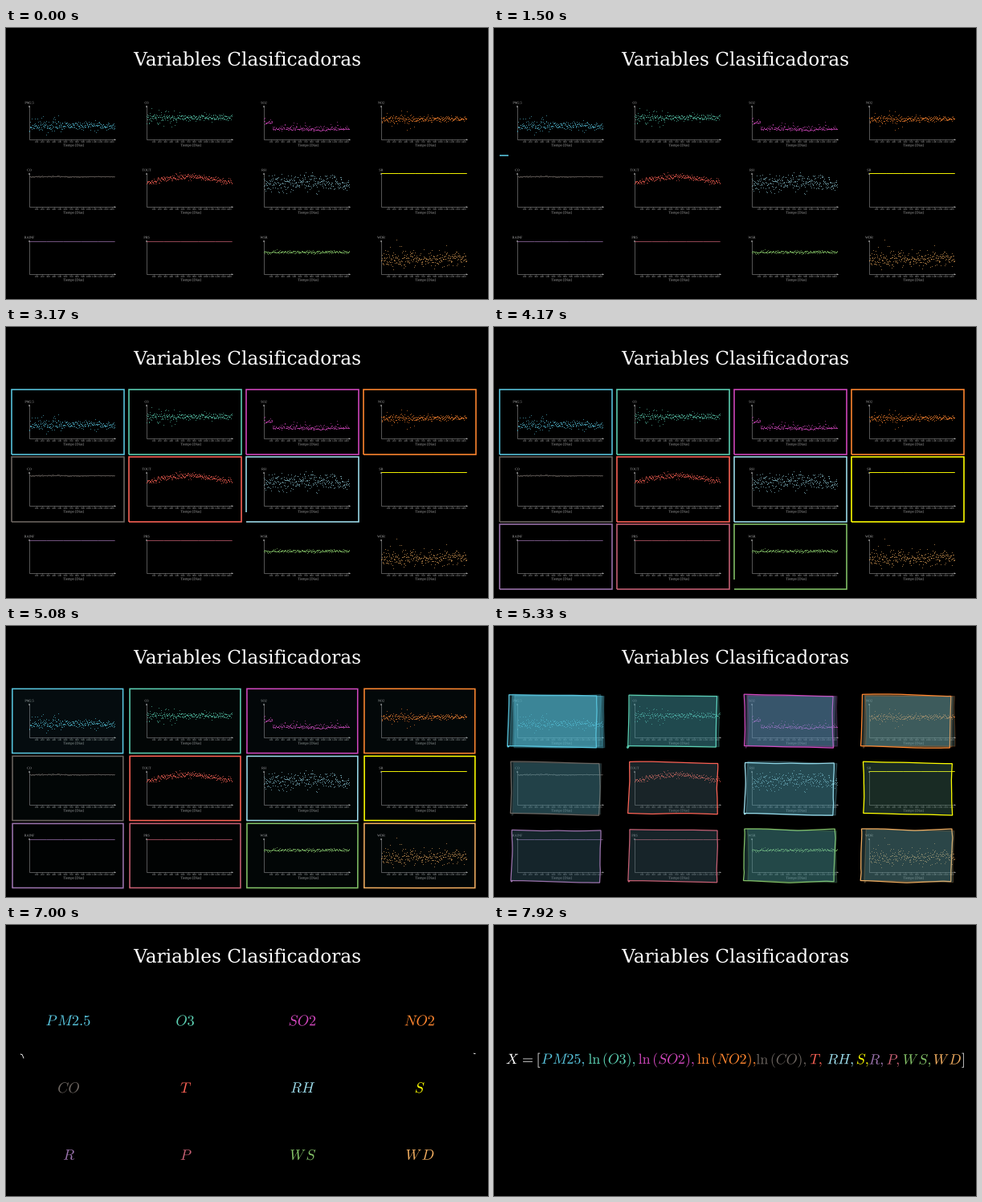
Write a matplotlib script that moves like this. It is 600 by 338 pixels and loops after 8 s.

```python
import numpy as np
import matplotlib.pyplot as plt
from matplotlib.animation import FuncAnimation
from matplotlib.collections import PathCollection
from matplotlib.colors import to_rgb
from matplotlib.patches import PathPatch
from matplotlib.path import Path
from matplotlib.textpath import TextPath

W, H, DPI = 600, 338, 100
FPS = 12                           # pace of the motion
FRAMES, INTERVAL = 200, 40
PX = 72 / DPI                      # points per pixel
plt.rcParams["mathtext.fontset"] = "cm"

DRAW_START, DRAW_EACH = 1465, 250  # frames are traced one after another
MORPH_START, JOIN_START, RUN = 4965, 6965, 1000
BOX_W, BOX_H, BOX_LW = 140, 81.5, 1.6
N = 200                            # samples per outline, multiple of 4
BLUE = np.array(to_rgb("#58C4DD"))
BASELINE = 173.2
DOT_ALPHA = .55

# plot label, symbol, vector entry, entry x, colour, level, arch, spread, early spread
VARS = [
    ("PM2.5", r"P\,M2.5", r"P\,M25,", 59.5, "#58C4DD", 17.5, 0, 2.2, 6),
    ("O3", "O3", r"\mathrm{ln}\,(O3),", 117.5, "#5CD0B3", 28, 0, 1.9, 6),
    ("SO2", "SO2", r"\mathrm{ln}\,(SO2),", 179.5, "#D147BD", 13, 0, 2.8, 6),
    ("NO2", "NO2", r"\mathrm{ln}\,(NO2),", 252.5, "#FF862F", 26, 0, 1.7, 5),
    ("CO", "CO", r"\mathrm{ln}\,(CO),", 328, "#6B645F", 37.7, .6, .25, .5),
    ("TOUT", "T", "T,", 394.5, "#FC6255", 30.5, 7.5, 1.8, 2),
    ("RH", "RH", "RH,", 415.5, "#9CDCEB", 29, 2, 5, 6),
    ("SR", "S", "S,", 451.5, "#FFFF00", 42, 0, .05, .05),
    ("RAINF", "R", "R,", 469, "#9A72AC", 41.3, 0, .05, .05),
    ("PRS", "P", "P,", 490.5, "#C55F73", 41.6, 0, .05, .05),
    ("WSR", r"W\,S", r"W\,S,", 510.5, "#83C167", 28, 0, 1, 1),
    ("WDR", r"W\,D", r"W\,D", 548, "#F0AC5F", 19.5, 0, 4, 6),
]
LINES = {"CO": .7, "SR": 1.1, "RAINF": .6, "PRS": .6}


def smooth(x):
    """Sigmoid ease from 0 to 1."""
    x = np.clip(x, 0, 1)
    edge = 1 / (1 + np.exp(5))
    return float(np.clip((1 / (1 + np.exp(-10 * (x - .5))) - edge) / (1 - 2 * edge), 0, 1))


def center(k):
    return 77 + 146 * (k % 4), 118.5 + 84 * (k // 4)


# ---- outlines -------------------------------------------------------------

def resample(loop):
    """N + 1 points evenly spaced along a closed outline, from its top left."""
    if np.hypot(*(loop[0] - loop[-1])) > 1e-6:
        loop = np.vstack([loop, loop[:1]])
    d = np.r_[0, np.cumsum(np.hypot(*np.diff(loop, axis=0).T))]
    s = np.linspace(0, d[-1], N + 1)
    pts = np.column_stack([np.interp(s, d, loop[:, 0]), np.interp(s, d, loop[:, 1])])
    top = np.argmin(pts[:-1] @ [.2, 1])
    pts = np.roll(pts[:-1], -top, axis=0)
    return np.vstack([pts, pts[:1]])


def oriented(loop, sign):
    x, y = loop.T
    area = np.sum(x[:-1] * y[1:] - x[1:] * y[:-1])
    return loop if area * sign > 0 else loop[::-1]


def inside(a, b):
    return (a.min(0) > b.min(0)).all() and (a.max(0) < b.max(0)).all()


def glyphs(tex, em, mid=None, left=None):
    """Letters of a formula, each a list of outlines (body first, then holes)."""
    tp = TextPath((0, 0), f"${tex}$", size=100)
    polys = Path(tp.vertices, tp.codes).to_polygons(closed_only=False)
    loops = [resample(np.asarray(p) * [em / 100, -em / 100]) for p in polys if len(p) > 3]
    pts = np.vstack(loops)
    if mid is not None:
        shift = np.array(mid) - (pts.min(0) + pts.max(0)) / 2
    else:
        shift = np.array([left - pts[:, 0].min(), BASELINE])
    loops = [p + shift for p in loops]
    out = []
    for p in loops:
        if any(inside(p, q) for q in loops):
            continue
        holes = [oriented(q, 1) for q in loops if inside(q, p)]
        out.append([oriented(p, -1)] + holes)
    return out


def box_corners(k):
    cx, cy = center(k)
    x0, x1 = cx - BOX_W / 2, cx + BOX_W / 2
    y0, y1 = cy - BOX_H / 2, cy + BOX_H / 2
    return np.array([(x0, y1), (x1, y1), (x1, y0), (x0, y0), (x0, y1)])


def box_loop(k):
    s = np.linspace(0, 4, N + 1)
    c = box_corners(k)
    return np.column_stack([np.interp(s, range(5), c[:, j]) for j in (0, 1)])


def partial_box(k, p):
    c, s = box_corners(k), 4 * p
    n = min(int(s), 3)
    return np.vstack([c[:n + 1], c[n] + (c[n + 1] - c[n]) * (s - n)])


def codes(n_loops):
    one = [Path.MOVETO] + [Path.LINETO] * (N - 1) + [Path.CLOSEPOLY]
    return np.array(one * n_loops, dtype=np.uint8)


# ---- moving parts ---------------------------------------------------------

class Morph:
    """One outline group turning into another; copies start transparent."""

    def __init__(self, ax, src, dst, color, is_copy, from_box):
        n = max(len(src), len(dst))
        self.src, self.dst = (self.pad(g, n) for g in (src, dst))
        self.codes = codes(n)
        self.color = np.array(to_rgb(color))
        self.is_copy, self.from_box = is_copy, from_box
        self.patch = PathPatch(Path(self.src, self.codes), lw=0, visible=False,
                               zorder=3, joinstyle="miter")
        ax.add_patch(self.patch)

    @staticmethod
    def pad(group, n):
        dot = np.repeat(group[-1][-1:], N + 1, axis=0)
        return np.vstack(group + [dot] * (n - len(group)))

    def show(self, a):
        p = self.patch
        p.set_visible(True)
        p.set_path(Path(self.src + (self.dst - self.src) * a, self.codes))
        shown = a if self.is_copy else 1
        if self.from_box:
            p.set_facecolor((*(BLUE + (self.color - BLUE) * a), a))
            p.set_edgecolor((*self.color, shown))
            p.set_linewidth(BOX_LW * (1 - a) * PX)
        else:
            p.set_facecolor((*self.color, shown))
            p.set_edgecolor("none")


class Pen:
    """Trace a letter's outline, then fill it."""

    def __init__(self, ax, group):
        self.pts, self.codes = np.vstack(group), codes(len(group))
        self.patch = PathPatch(Path(self.pts, self.codes), visible=False, zorder=3)
        ax.add_patch(self.patch)

    def show(self, p):
        n = int(round(min(2 * p, 1) * len(self.pts)))
        fill = max(2 * p - 1, 0)
        self.patch.set_visible(n > 1)
        if n > 1:
            self.patch.set_path(Path(self.pts[:n], self.codes[:n]))
            self.patch.set_facecolor((1, 1, 1, fill))
            self.patch.set_edgecolor((1, 1, 1, 1 if fill < 1 else 0))
            self.patch.set_linewidth(.85 * (1 - fill) * PX)


def morphs(ax, src, dst, color, from_box=False):
    """Repeat source letters so that every target letter has a partner."""
    out, last = [], -1
    for j, g in enumerate(dst):
        i = j * len(src) // len(dst)
        out.append(Morph(ax, src[i], g, color, i == last, from_box))
        last = i
    return out


# ---- static parts ---------------------------------------------------------

def text_path(s, size, x, y, family="Liberation Serif"):
    tp = TextPath((0, 0), s, size=size, prop={"family": family})
    v = tp.vertices * [1, -1]
    mid = (tp.get_extents().x0 + tp.get_extents().x1) / 2
    return Path(v + [x - mid, y], tp.codes)


def triangle(x, y, dx, dy):
    """Arrow tip at (x, y) pointing along (dx, dy)."""
    t = np.array([x, y])
    d, n = np.array([dx, dy]), np.array([-dy, dx])
    return Path([t, t - 2.4 * d + n, t - 2.4 * d - n, t], closed=True)


def make_plot(ax, k, label, color, level, arch, sd, early):
    """Axes, labels and dots of one plot, each with its opacity."""
    cx, cy = center(k)
    x0, y0 = cx - 48, cy + 20.8
    rng = np.random.default_rng(40 + k)

    ticks = [x0 + 9 + 7.2 * j for j in range(14)]
    lines = [Path([(x0, y0), (x0 + 107, y0)]), Path([(x0, y0), (x0, y0 - 42)])]
    lines += [Path([(x, y0 - .8), (x, y0 + .8)]) for x in ticks]
    axes = PathCollection(lines, facecolors="none", edgecolors="#9a9a9a",
                          linewidths=.55 * PX, zorder=1)
    words = [text_path(str(100 * (j + 1)), 3.1, x, y0 + 3.6) for j, x in enumerate(ticks)]
    words += [text_path("Tiempo [Días]", 4.4, cx + 7, y0 + 8.2),
              text_path(label, 4.2, x0, y0 - 44.8),
              triangle(x0 + 108, y0, 1, 0), triangle(x0, y0 - 43, 0, -1)]
    marks = PathCollection(words, facecolors="#b4b4b4", edgecolors="none",
                           linewidths=0, zorder=1)
    for c in (axes, marks):
        ax.add_collection(c)

    n = 420 if label in LINES else 290
    u = np.linspace(0, 1, n)
    noise = rng.standard_normal(n)
    wild = (u < .4) & (rng.random(n) < .55)
    if label == "SO2":
        noise = np.abs(noise) * (rng.random(n) < .6) + .12 * noise
        level = level + 8 * (u < .1) - 1.2 * (u > .45) * (u < .75)
    up = level + arch * np.sin(np.pi * u ** .95) + noise * np.where(wild, early, sd)
    if label == "WDR":
        up += (rng.random(n) < .08) * rng.normal(4, 7, n)
    if label == "CO":
        up += .35 * np.sin(9 * u)
    d = LINES.get(label, .95) * PX
    dots = ax.scatter(x0 + 106 * u, y0 - np.clip(up, 6, 43), s=d * d, c=color,
                      linewidths=0, zorder=2)
    return [(axes, 1), (marks, 1), (dots, DOT_ALPHA)]


fig = plt.figure(figsize=(W / DPI, H / DPI), dpi=DPI, facecolor="black")
ax = fig.add_axes([0, 0, 1, 1])
ax.set(xlim=(0, W), ylim=(H, 0))
ax.axis("off")
ax.set_autoscale_on(False)
ax.add_patch(PathPatch(text_path("Variables Clasificadoras", 23.2, 299.9, 46.8, "DejaVu Serif"),
                       fc="white", lw=0, zorder=4))

plots, boxes, shrink, join = [], [], [], []
for k, (label, symbol, entry, left, color, *shape) in enumerate(VARS):
    plots += make_plot(ax, k, label, color, *shape)
    boxes += ax.plot([], [], color=color, lw=BOX_LW * PX, solid_joinstyle="miter",
                     solid_capstyle="butt", zorder=3)
    cx, cy = center(k)
    sym = glyphs(symbol, 18.4, mid=(cx + .3, cy + .4))
    shrink += morphs(ax, [[box_loop(k)]], sym, color, from_box=True)
    join += morphs(ax, sym, glyphs(entry, 18, left=left), color)

# letters written in white, with their start lag
pens = [(Pen(ax, g), lag, total)
        for tex, left, lag, total in (("X", 15.3, 0, 1.4), ("=", 36, .2, 1.4),
                                      ("[", 54.7, .4, 1.4), ("]", 582.5, 0, 1))
        for g in glyphs(tex, 18, left=left)]


def update(i):
    t = round(i * INTERVAL * FPS / 1000) * 1000 / FPS
    a = smooth((t - MORPH_START) / RUN)
    for p, opacity in plots:
        p.set_alpha(opacity * (1 - a))
        p.set_visible(a < 1)

    for k, box in enumerate(boxes):
        p = smooth((t - DRAW_START) / DRAW_EACH - k)
        box.set_visible(p > 0 and t < MORPH_START)
        if p > 0:
            box.set_data(*partial_box(k, p).T)

    for group, start, end in ((shrink, MORPH_START, JOIN_START), (join, JOIN_START, 1e9)):
        for m in group:
            if start <= t < end:
                m.show(smooth((t - start) / RUN))
            else:
                m.patch.set_visible(False)

    w = np.clip((t - JOIN_START) / RUN, 0, 1)
    for pen, lag, total in pens:
        pen.show(np.clip(w * total - lag, 0, 1))
    return []


anim = FuncAnimation(fig, update, frames=FRAMES, init_func=lambda: [],
                     interval=INTERVAL, repeat=True, repeat_delay=0, blit=False)
plt.show()
```
